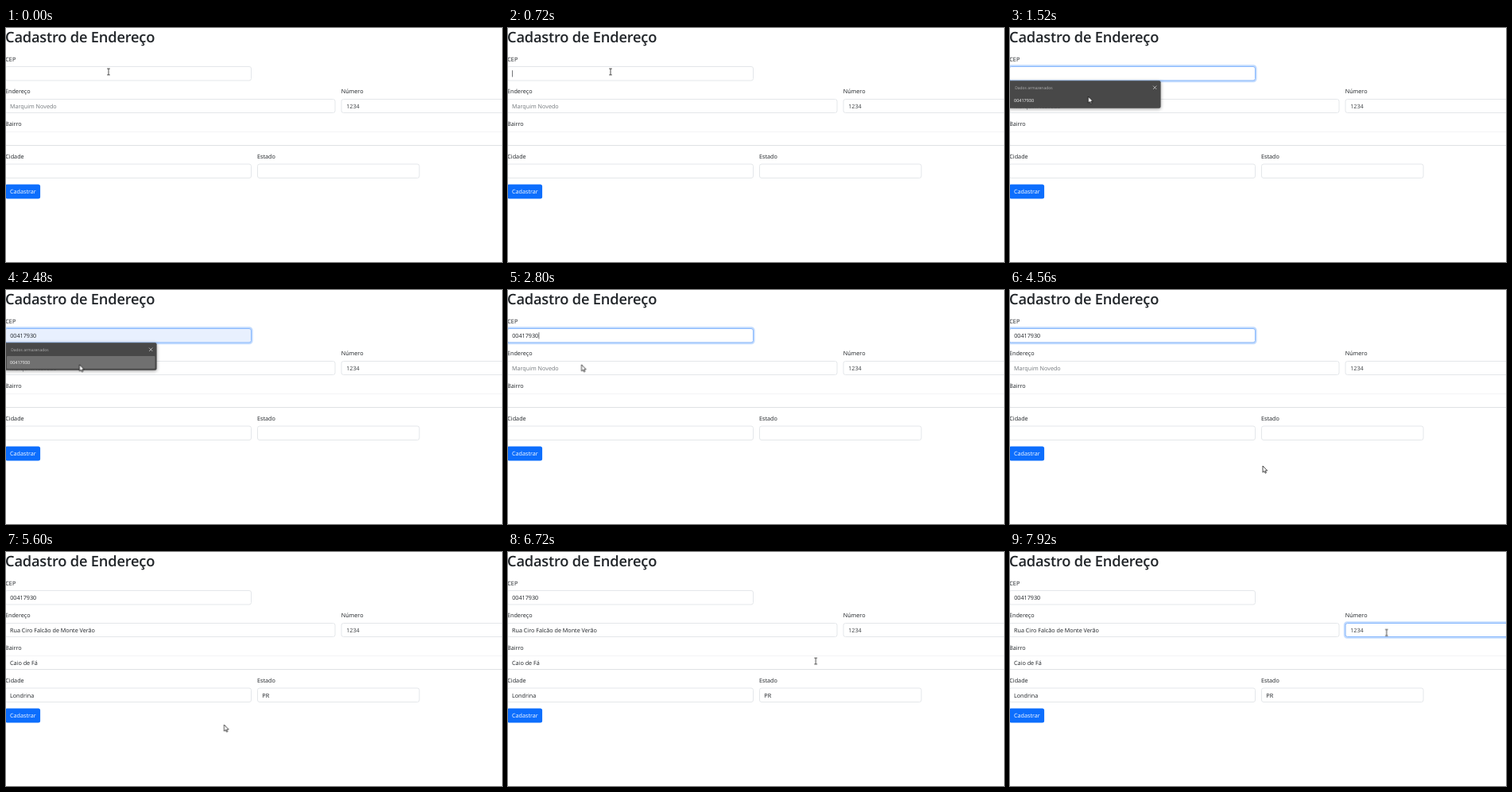
Animation of 624x294 px, one loop 8 s. Source, as an HTML page:

```html
<!DOCTYPE html>
<html lang="pt-BR">
<head>
<meta charset="utf-8">
<title>Cadastro de Endereço</title>
<style>
  html, body { margin: 0; width: 100%; height: 100%; overflow: hidden; background: #fff; }
  svg { display: block; width: 624px; height: 294px; }
  text { font: 7.22px "Open Sans", "Noto Sans", sans-serif; fill: #1b1f23; text-rendering: geometricPrecision; }
  .title { font-size: 18.3px; font-weight: 600; letter-spacing: -.21px; fill: #212529; }
  .hint { fill: #72777b; }
  .number { fill: #3c4043; }
  .light { fill: #fff; }
  .field { fill: #fff; stroke: #e4e7ea; }
  .faint { stroke: #f3f4f6; }
  .base { stroke: #dfe1e4; }
  .ring { fill: none; stroke: #c2dbfe; stroke-width: 2; }
  .edge { fill: none; stroke: #86b7fe; }
  .caret { stroke: #212529; stroke-width: .7; }
  .menu { filter: drop-shadow(0 1px 2px rgba(0, 0, 0, .4)); }
  .menu text { font-size: 5.5px; fill: #fff; }
  .menu .small { font-size: 4.95px; fill: #b4b4b4; }

  /* 1% of the loop is 80 ms */
  .step { animation: 8s step-end infinite; }
  .fade { animation: 8s linear infinite; }
  .cep-focus { animation-name: cep-focus; }
  .cep-caret { animation-name: cep-caret; }
  .cep-value { animation-name: cep-value; }
  .preview { animation-name: preview; }
  .menu { animation-name: menu; }
  .hover { animation-name: preview; }
  .first, .empty { animation-name: empty; }
  .filled { animation-name: filled; }
  .num-focus { animation-name: num-focus; }
  .num-caret { animation-name: num-caret; }
  .arrow { animation-name: arrow; }
  .beam { animation-name: beam; }
  .cursor { animation-name: move; }

  @keyframes cep-focus { 0%, 9%, 59%, 100% { opacity: 0 } 11%, 57% { opacity: 1 } }
  @keyframes cep-caret {
    0%, 15.25%, 40.25%, 52.75%, 57% { opacity: 0 }
    9%, 34%, 46.5% { opacity: 1 }
  }
  @keyframes cep-value { 0% { opacity: 0 } 20% { opacity: 1 } }
  @keyframes preview { 0%, 34% { opacity: 0 } 20% { opacity: 1 } }
  @keyframes menu { 0%, 34% { opacity: 0 } 10% { opacity: 1 } }
  @keyframes empty { 0% { opacity: 1 } 63% { opacity: 0 } }
  @keyframes filled { 0% { opacity: 0 } 63% { opacity: 1 } }
  @keyframes num-focus { 0%, 92% { opacity: 0 } 94%, 100% { opacity: 1 } }
  @keyframes num-caret { 0%, 98.25% { opacity: 0 } 92% { opacity: 1 } }
  @keyframes caret-jump { 0% { transform: none } 20% { transform: translateX(33.4px) } }
  .cep-caret .caret { animation-name: caret-jump; }

  @keyframes beam {
    0%, 36.5%, 43.5%, 79%, 83%, 86.6% { opacity: 1 }
    15%, 41%, 44.4%, 81%, 84.6% { opacity: 0 }
  }
  @keyframes arrow {
    0%, 36.5%, 43.5%, 79%, 83%, 86.6% { opacity: 0 }
    15%, 41%, 44.4%, 81%, 84.6% { opacity: 1 }
  }
  @keyframes move {
    0%, 13% { transform: translate(129px, 55px) }
    15% { transform: translate(117px, 68px) }
    19% { transform: translate(98.5px, 86px) }
    22% { transform: translate(93px, 92px) }
    31%, 36% { transform: translate(92.5px, 93.7px) }
    40% { transform: translate(290px, 100px) }
    42.5% { transform: translate(466px, 120px) }
    44.4% { transform: translate(440px, 150px) }
    47% { transform: translate(363.5px, 222.5px) }
    50% { transform: translate(332px, 235px) }
    54%, 66% { transform: translate(318px, 221px) }
    70% { transform: translate(274.5px, 217px) }
    74% { transform: translate(250px, 205px) }
    78% { transform: translate(240px, 194px) }
    82% { transform: translate(330px, 160px) }
    87% { transform: translate(472px, 103px) }
    90%, 100% { transform: translate(473.7px, 101.3px) }
  }
</style>
</head>
<body>
<svg viewBox="0 0 624 294">
  <text class="title" x="-1" y="17.6">Cadastro de Endereço</text>

  <text x="-.7" y="41.6">CEP</text>
  <text x="-1" y="82.3">Endereço</text>
  <text x="421.7" y="82.3">Número</text>
  <text x="-1" y="123.3">Bairro</text>
  <text x="-.7" y="164.2">Cidade</text>
  <text x="316" y="164.2">Estado</text>

  <rect class="field" x="-1" y="48.5" width="309.5" height="17.5" rx="2.5"/>
  <rect class="field" x="-1" y="89.5" width="415" height="17" rx="2.5"/>
  <rect class="field" x="422" y="89.5" width="210" height="17" rx="2.5"/>
  <rect class="field faint" x="-1" y="130.5" width="640" height="17" rx="2.5"/>
  <path class="base" d="M0 147.5H624"/>
  <rect class="field" x="-1" y="171" width="309.5" height="17.5" rx="2.5"/>
  <rect class="field" x="316.5" y="171" width="203.5" height="17.5" rx="2.5"/>

  <rect x="-1" y="196.4" width="44.1" height="18" rx="2.5" fill="#0d6efd"/>
  <text class="light" x="5" y="208.2">Cadastrar</text>

  <rect class="step preview" x="-1" y="48.5" width="309.5" height="17.5" rx="2.5" fill="#e8f0fe"/>
  <g class="fade cep-focus">
    <rect class="ring" x="-2" y="47.2" width="311.6" height="20" rx="3.5"/>
    <rect class="edge" x="-1" y="48.5" width="309.5" height="17.5" rx="2.5"/>
  </g>
  <text class="step cep-value" x="5.2" y="59.8">00417930</text>
  <g class="step cep-caret">
    <path class="caret step" d="M5.4 53.2V61.5"/>
  </g>

  <g class="fade num-focus">
    <rect class="ring" x="420.8" y="88.2" width="212" height="19.6" rx="3.5"/>
    <rect class="edge" x="422" y="89.5" width="210" height="17" rx="2.5"/>
  </g>
  <text class="number" x="428.2" y="100.8">1234</text>
  <path class="caret step num-caret" d="M428 94.2V102.4"/>

  <text class="hint step empty" x="5" y="100.8">Marquim Novedo</text>
  <g class="step filled">
    <text x="5" y="100.8">Rua Ciro Falcão de Monte Verão</text>
    <text x="5" y="141.8">Caio de Fá</text>
    <text x="5" y="182.6">Londrina</text>
    <text x="322.3" y="182.6">PR</text>
  </g>

  <g class="step menu">
    <rect x="-2" y="66.3" width="191.6" height="34.5" rx="2" fill="#484848"/>
    <rect class="step hover" x="1" y="83" width="186.5" height="15.8" rx="1" fill="#707070"/>
    <text class="small" x="6.2" y="76.6">Dados armazenados</text>
    <path d="M180 72.6l4.4 4.4m0-4.4l-4.4 4.4" stroke="#ddd" stroke-width=".7"/>
    <text x="5" y="93">00417930</text>
  </g>

  <g class="fade cursor">
    <path class="step beam" d="M-1.8-3.9H1.8M0-3.9V3.9M-1.8 3.9H1.8" fill="none" stroke="#222" stroke-width=".8"/>
    <path class="step arrow" d="M0 0V8.2L1.9 6.5 3.1 9.2 4.4 8.6 3.2 6H5.7Z" fill="#fff" stroke="#000" stroke-width=".7"/>
  </g>
</svg>
</body>
</html>
```
